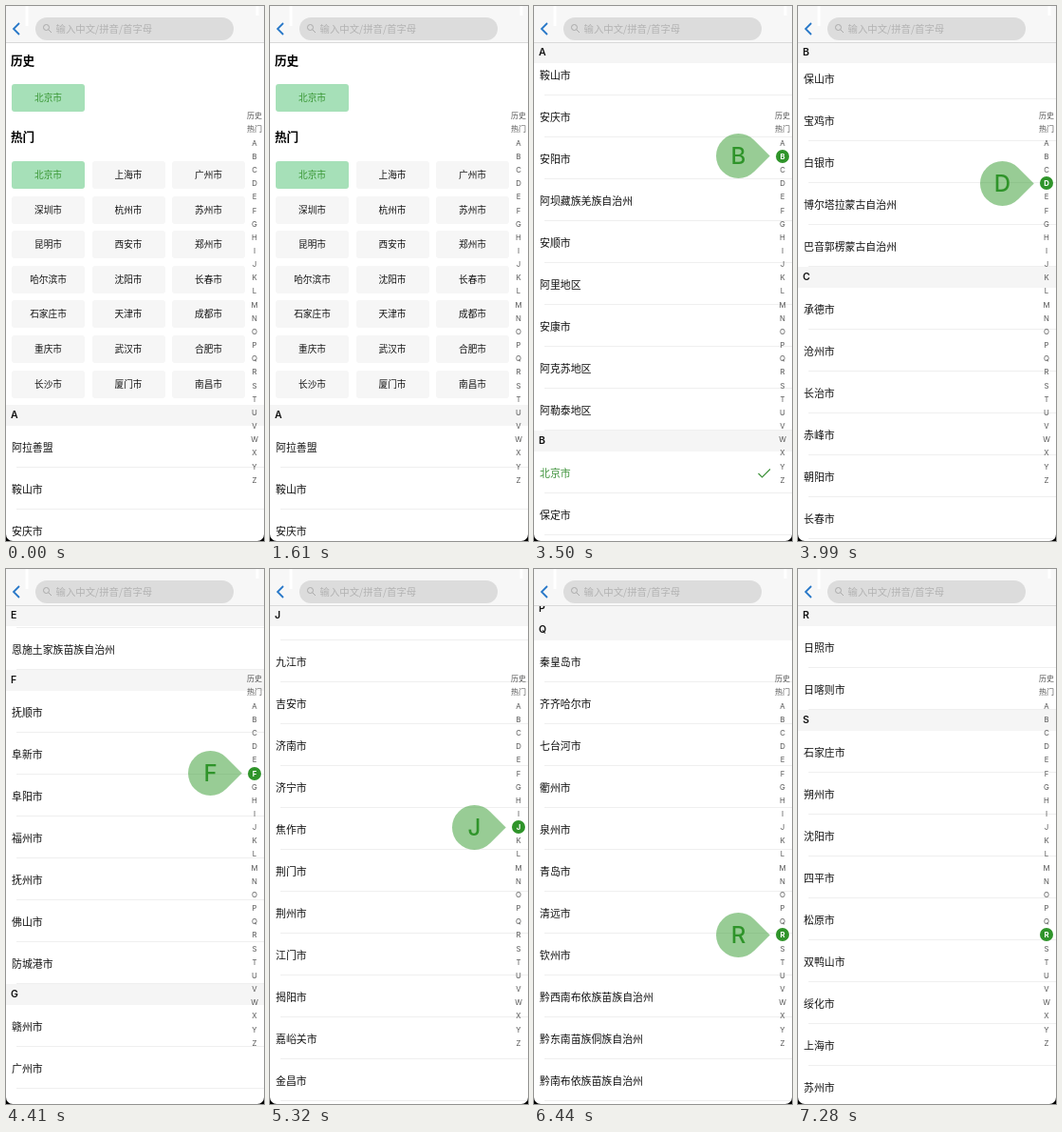
Animation of 272 by 562 pixels, one loop 7.63 s. Source, as an HTML page:

```html
<!DOCTYPE html>
<html lang="zh-CN">
<head>
<meta charset="utf-8">
<title>城市选择</title>
<style>
  html, body { margin: 0; width: 100%; height: 100%; overflow: hidden; background: #000; }
  body { font-family: "Noto Sans CJK SC", "Noto Sans CJK", sans-serif; color: #111; }
  #stage { position: absolute; left: 0; top: 0; width: 272px; height: 562px; overflow: hidden;
    background: #fff; border-radius: 0 0 7px 7px; }
  #list { position: absolute; left: 0; top: 0; width: 272px; will-change: transform; }
  #grid { position: relative; height: 419px; }
  .title { position: absolute; left: 5px; line-height: 20px; font-size: 12.6px; font-weight: 700; color: #000; }
  .chip { position: absolute; width: 77px; height: 29px; line-height: 29px; border-radius: 3px;
    background: #f6f6f6; font-size: 9.7px; text-align: center; }
  .chip.on { background: #a6e0b8; color: #35942f; }
  .head { height: 22px; padding-left: 5px; box-sizing: border-box; width: 272px;
    background: #f5f5f5; font: 600 10.5px/22px Inter, "Liberation Sans", sans-serif; color: #111; }
  .row { position: relative; height: 44px; line-height: 44px; padding-left: 6px; font-size: 10.9px; white-space: nowrap; }
  .row::after { content: ""; position: absolute; left: 11px; right: 0; bottom: 0; height: 1px; background: #efefef; }
  .row.on { color: #3b9138; }
  .row svg { position: absolute; left: 235px; top: 16px; }
  #sticky { position: absolute; left: 0; top: 0; }
  #bar { position: absolute; left: 0; top: 0; }
  #bar text { font-size: 10.4px; fill: #b2b2b2; font-weight: 500; }
  .key { position: absolute; left: 252px; width: 20px; height: 14px; line-height: 14px; text-align: center;
    font-size: 8px; color: #555; white-space: nowrap; }
  .letter { font-family: Inter, "Liberation Sans", sans-serif; font-size: 7.8px; }
  .key.on { left: 255px; width: 14px; border-radius: 7px; background: #2f942a; color: #fff; font-weight: 700; }
  #bubble { position: absolute; left: 192px; width: 47px; height: 47px; }
  #drop { position: absolute; inset: 0; border-radius: 50% 50% 0 50%; transform: rotate(-45deg);
    background: rgba(51, 153, 45, .5); }
  #big { position: absolute; inset: 0; text-align: center; color: #2f942a;
    font: 500 24px/47px Inter, "Liberation Sans", sans-serif; }
</style>
</head>
<body>
<div id="stage">
  <div id="list"><div id="grid"></div></div>
  <div id="sticky" class="head"></div>
  <svg id="bar" width="272" height="39" viewBox="0 0 272 39">
    <rect width="272" height="38" fill="#f7f7f7"/>
    <rect y="38" width="272" height="1" fill="#d9d9d9"/>
    <path d="M22 0V21M265 0V10" stroke="#fff" stroke-width="3"/>
    <path d="M14 18L8 24L14 30" fill="none" stroke="#2878c8" stroke-width="1.8"/>
    <rect x="31" y="12" width="209" height="24" rx="12" fill="#dcdcdc"/>
    <g fill="none" stroke="#aaa"><circle cx="42.5" cy="22.5" r="3"/><path d="M44.8 24.8L48 28"/></g>
    <text x="52.5" y="27.6">输入中文/拼音/首字母</text>
  </svg>
  <div id="index"></div>
  <div id="bubble"><div id="drop"></div><div id="big"></div></div>
</div>
<script>
const LOOP = 7630, STEP = 70, BAR = 38, HEAD = 22, ROW = 44;

const HOT = '北京 上海 广州 深圳 杭州 苏州 昆明 西安 郑州 哈尔滨 沈阳 长春 石家庄 天津 成都 重庆 武汉 合肥 长沙 厦门 南昌'.split(' ');

// Names without a suffix are cities and get 市.
const CITIES = {
  A: '阿拉善盟 鞍山 安庆 安阳 阿坝藏族羌族自治州 安顺 阿里地区 安康 阿克苏地区 阿勒泰地区',
  B: '北京 保定 包头 巴彦淖尔 本溪 白山 白城 蚌埠 亳州 滨州 北海 百色 巴中 毕节 保山 宝鸡 白银 博尔塔拉蒙古自治州 巴音郭楞蒙古自治州',
  C: '承德 沧州 长治 赤峰 朝阳 长春 常州 滁州 池州 长沙 常德 郴州 潮州 崇左 重庆 成都 楚雄彝族自治州 昌都 昌吉回族自治州',
  D: '大同 大连 丹东 大庆 大兴安岭地区 东营 德州 东莞 儋州 德阳 达州 大理白族自治州 德宏傣族景颇族自治州 迪庆藏族自治州 定西',
  E: '鄂尔多斯 鄂州 恩施土家族苗族自治州',
  F: '抚顺 阜新 阜阳 福州 抚州 佛山 防城港',
  G: '赣州 广州 桂林 贵港 广元 广安 甘孜藏族自治州 贵阳 甘南藏族自治州 果洛藏族自治州 固原',
  H: '邯郸 衡水 呼和浩特 呼伦贝尔 葫芦岛 哈尔滨 鹤岗 黑河 淮安 杭州 湖州 合肥 淮南 淮北 黄山 菏泽 鹤壁 黄石 黄冈 衡阳 怀化 惠州 河源 贺州 河池 海口 红河哈尼族彝族自治州 汉中 海东 海北藏族自治州 黄南藏族自治州 海南藏族自治州 海西蒙古族藏族自治州 哈密 和田地区',
  J: '晋城 晋中 锦州 吉林 鸡西 佳木斯 嘉兴 金华 景德镇 九江 吉安 济南 济宁 焦作 荆门 荆州 江门 揭阳 嘉峪关 金昌 酒泉',
  K: '开封 昆明 克拉玛依 克孜勒苏柯尔克孜自治州 喀什地区',
  L: '廊坊 临汾 吕梁 辽阳 辽源 连云港 丽水 六安 龙岩 临沂 聊城 洛阳 漯河 娄底 柳州 来宾 泸州 乐山 凉山彝族自治州 六盘水 丽江 临沧 拉萨 林芝 兰州 陇南 临夏回族自治州',
  M: '牡丹江 马鞍山 茂名 梅州 绵阳 眉山',
  N: '南京 南通 宁波 南平 宁德 南昌 南阳 南宁 内江 南充 怒江傈僳族自治州 那曲',
  P: '盘锦 莆田 萍乡 平顶山 濮阳 攀枝花 普洱 平凉',
  Q: '秦皇岛 齐齐哈尔 七台河 衢州 泉州 青岛 清远 钦州 黔西南布依族苗族自治州 黔东南苗族侗族自治州 黔南布依族苗族自治州 曲靖 庆阳',
  R: '日照 日喀则',
  S: '石家庄 朔州 沈阳 四平 松原 双鸭山 绥化 上海 苏州 宿迁 绍兴 宿州 三明 上饶'
};

const $ = id => document.getElementById(id);
function add(parent, cls, text) {
  const el = document.createElement('div');
  el.className = cls;
  el.textContent = text;
  parent.appendChild(el);
  return el;
}
const place = (el, x, y) => { el.style.left = x + 'px'; el.style.top = y + 'px'; };

// Titles and chips
place(add($('grid'), 'title', '历史'), 5, 47);
place(add($('grid'), 'title', '热门'), 5, 127);
place(add($('grid'), 'chip on', '北京市'), 6, 82);
HOT.forEach((name, i) => {
  const chip = add($('grid'), i ? 'chip' : 'chip on', name + '市');
  place(chip, 6 + (i % 3) * 84.5, 163 + Math.floor(i / 3) * 36.6);
});

// City sections
const sections = [], headY = {};
let endY = 419;
for (const [letter, names] of Object.entries(CITIES)) {
  sections.push({ letter, y: endY });
  headY[letter] = endY;
  add($('list'), 'head', letter);
  const rows = names.split(' ');
  for (const name of rows) {
    const full = /(自治州|地区|盟)$/.test(name) ? name : name + '市';
    const row = add($('list'), 'row', full);
    if (name === '北京') {
      row.className = 'row on';
      row.insertAdjacentHTML('beforeend', '<svg width="16" height="14"><path d="M1.5 7L5.5 11L14 2.5" fill="none" stroke="#3b9138" stroke-width="1.1"/></svg>');
    }
  }
  endY += HEAD + rows.length * ROW;
}

// Side index
const keyY = c => 143.7 + (c.charCodeAt(0) - 65) * 14.16;
const keyEls = {};
place(add($('index'), 'key', '历史'), 252, 108);
place(add($('index'), 'key', '热门'), 252, 122.3);
for (const c of 'ABCDEFGHIJKLMNOPQRSTUVWXYZ') {
  keyEls[c] = add($('index'), 'key letter', c);
  keyEls[c].style.top = keyY(c) - 7 + 'px';
}

// Time at which the finger reaches each letter
const touchTimes = [['A', 2870], ['B', 3430], ['C', 3780], ['D', 3990], ['E', 4130], ['F', 4340],
  ['G', 4620], ['H', 4830], ['I', 5110], ['J', 5250], ['K', 5460], ['L', 5600], ['M', 5740],
  ['N', 5880], ['O', 6020], ['P', 6090], ['Q', 6160], ['R', 6230]];
const RELEASE = 6720;

// Scroll offset over time
const knots = [[0, 0], [2240, 0], [2380, 80], [2800, 80], [3290, headY.A - BAR], [3360, headY.A - BAR],
  [3500, 435], [3780, headY.B - 90], [4410, headY.F - 106], [5320, headY.J + HEAD + 9 * ROW - 75],
  [6020, headY.M - 470], [RELEASE, headY.R - BAR], [LOOP, headY.R - BAR]];
const rates = knots.slice(1).map((k, i) => (k[1] - knots[i][1]) / (k[0] - knots[i][0]));
const slopes = knots.map((k, i) => {
  const a = rates[i - 1], b = rates[i];
  return a > 0 && b > 0 ? 2 * a * b / (a + b) : 0;
});

function scrollAt(t) {
  let i = 0;
  while (i < knots.length - 2 && t >= knots[i + 1][0]) i++;
  const [t0, a] = knots[i], [t1, b] = knots[i + 1];
  const d = t1 - t0, u = (t - t0) / d, v = 1 - u;
  return a * v * v * (1 + 2 * u) + b * u * u * (3 - 2 * u)
    + d * u * v * (slopes[i] * v - slopes[i + 1] * u);
}

function draw(t) {
  const off = Math.round(scrollAt(t));
  $('list').style.transform = `translateY(${-off}px)`;

  const n = sections.filter(s => s.y - off <= BAR).length;
  $('sticky').style.display = n ? '' : 'none';
  if (n) {
    const next = sections[n];
    const pos = next ? Math.min(BAR, next.y - off - HEAD) : BAR;
    $('sticky').textContent = sections[n - 1].letter;
    $('sticky').style.transform = `translateY(${pos}px)`;
  }

  const hit = touchTimes.filter(k => k[1] <= t).pop();
  const now = hit && hit[0];
  for (const c in keyEls) keyEls[c].className = c === now ? 'key letter on' : 'key letter';
  $('bubble').style.display = now && t < RELEASE ? '' : 'none';
  if (now) {
    $('bubble').style.top = keyY(now) - 23.5 + 'px';
    $('big').textContent = now;
  }
}

const startTime = performance.now();
function tick() {
  const t = (performance.now() - startTime) % LOOP;
  draw(Math.floor(t / STEP) * STEP);
  requestAnimationFrame(tick);
}
tick();
</script>
</body>
</html>
```
